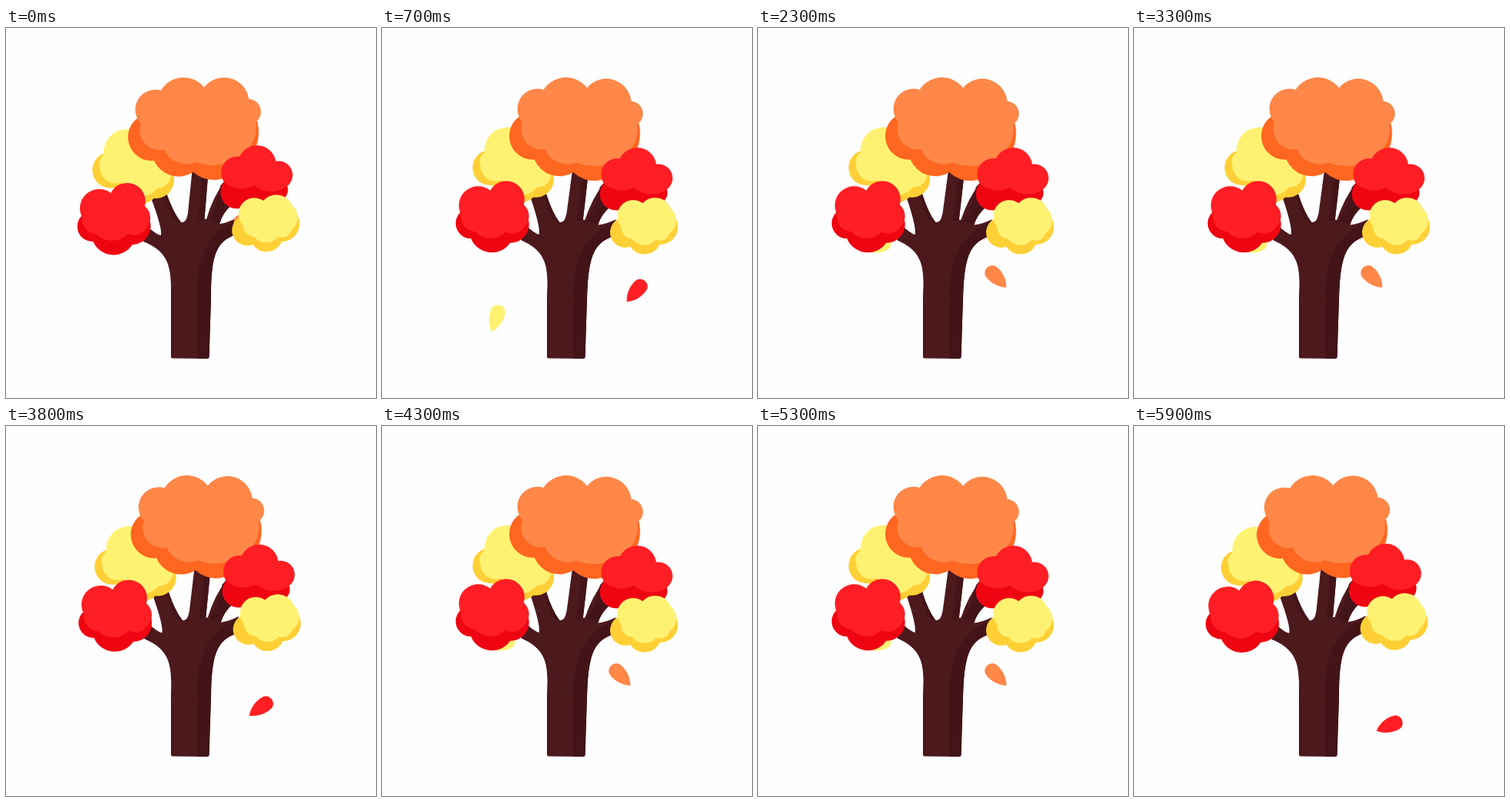
An HTML page that plays this animation: 480 px wide and 480 px high, repeating every 6000 ms.

```html
<!DOCTYPE html>
<html lang="en">
<head>
<meta charset="utf-8">
<title>Autumn tree</title>
<style>
  html, body { margin: 0; height: 100%; overflow: hidden; background: #fefefe; }
  svg { display: block; width: 100vw; height: 100vh; }
  .bark { fill: #4c191d; }
  .bark-shade { fill: #421418; }
  .orange { fill: #ff8748; }
  .orange-shade { fill: #ff6620; }
  .yellow { fill: #fff273; }
  .yellow-shade { fill: #ffd036; }
  .red { fill: #ff1e23; }
  .red-shade { fill: #ee0511; }
</style>
</head>
<body>
<svg viewBox="0 0 480 480">
  <defs>
    <path id="leaf" d="M19 0C10 -9 -3 -11 -11 -9C-19 -6 -19 6 -11 9C-3 11 10 9 19 0Z"/>
  </defs>

  <path class="bark" d="M214 349H266L263.500 427Q263 429 261 429L216 428.500Q214 428.500 214 426.500Z"/>
  <path class="bark-shade" d="M248 349H266L263.500 427Q263 429 261 429H248Z"/>

  <g class="sway">
    <path class="bark" d="M214 351V332C213 306 208 289 178 277L184 258Q195 268 201 269Q203 260 188 220L208 214Q217 240 227 252Q234 254 236 240L242 180H263L257.500 248L260 248Q268 220 284 198L292 230Q281 240 277 254Q287 253 300 246L298 268C274 277 267 292 266 340V351Z"/>
    <path class="bark-shade" d="M248 351V332C249.500 300 259 276 281 259L300 250L298 268C274 277 267 292 266 340V351Z"/>
    <path class="bark-shade" d="M254 180H263L257.500 248Q253 250 249 249Q253 225 254 180ZM278 205L284 198L292 230Q281 240 277 254L263 249Q276 230 278 205ZM203 214H208Q217 240 227 252Q221 252 216 246Z"/>
  </g>

  <g id="leaves"></g>

  <g class="sway">
    <path class="yellow-shade" d="M180 150L217 190A24 24 0 0 1 192 221A32 32 0 0 1 140 207A23.200 23.200 0 0 1 124 164Z"/>
    <path class="yellow" d="M122 182A14 14 0 0 1 127 165A30 30 0 0 1 178 140L214 188A18 18 0 0 1 196 208A26 26 0 0 1 150 200A20 20 0 0 1 122 182Z"/>

    <path class="orange-shade" d="M326 121A55 55 0 0 1 300 183A40 40 0 0 1 243 187A35 35 0 0 1 192 172A30.600 30.600 0 0 1 172 116Z"/>
    <path class="orange" d="M175 124A26 26 0 0 1 201 81A34 34 0 0 1 257 77A32.500 32.500 0 0 1 315 92A16.600 16.600 0 0 1 324 122A42 42 0 0 1 299 168A55 55 0 0 1 247 174A32 32 0 0 1 205 158A26 26 0 0 1 175 124Z"/>

    <path class="red-shade" d="M362 200A15 15 0 0 1 350 225L303 234A21 21 0 0 1 283 200Z"/>
    <path class="red" d="M283 200A21 21 0 0 1 303 167A24.700 24.700 0 0 1 350 173A18.200 18.200 0 0 1 362 207A34 34 0 0 1 322 204A34 34 0 0 1 283 200Z"/>

    <path class="yellow-shade" d="M376 240A23 23 0 0 1 358 277A22 22 0 0 1 320 281A19.800 19.800 0 0 1 302 246Z"/>
    <path class="yellow" d="M307 255A20.700 20.700 0 0 1 334 224A22 22 0 0 1 371 230A20 20 0 0 1 370 262A13 13 0 0 1 353 271A20 20 0 0 1 322 271A16 16 0 0 1 307 255Z"/>

    <path class="red-shade" d="M185 246A24 24 0 0 1 164 281A29 29 0 0 1 113 277A19.500 19.500 0 0 1 99 243Z"/>
    <path class="red" d="M99 246A25 25 0 0 1 136 214A23.700 23.700 0 0 1 180 231A20 20 0 0 1 181 261A18 18 0 0 1 158 267A28 28 0 0 1 118 268A20 20 0 0 1 99 246Z"/>
  </g>
</svg>
<script>
const PERIOD = 1000, STEP = 100, MAX_TILT = 2.85;
const swaying = document.querySelectorAll(".sway");

// Each leaf passes (x, y, angle) at time `at`; speeds are per cycle.
const leaves = [
  { color: "orange", from: 0, to: 0.7, at: 0.3, x: 309, y: 323, angle: 46, dx: -12, dy: 235, spin: 130 },
  { color: "yellow", from: 0.2, to: 0.8, at: 0.3, x: 156, y: 282, angle: 160, dx: -20, dy: 235, spin: -130 },
  { color: "red", from: 0.4, to: 1, at: 0.9, x: 332, y: 388, angle: 157, dx: 10, dy: 235, spin: 130 }
];

for (const leaf of leaves) {
  leaf.node = document.createElementNS("http://www.w3.org/2000/svg", "use");
  leaf.node.setAttribute("href", "#leaf");
  leaf.node.setAttribute("class", leaf.color);
  document.getElementById("leaves").append(leaf.node);
}

function draw(now) {
  const phase = Math.floor((now % PERIOD) / STEP) * STEP / PERIOD;
  const tilt = MAX_TILT * (1 - Math.cos(2 * Math.PI * phase)) / 2;
  for (const part of swaying) part.setAttribute("transform", `rotate(${tilt} 236 350)`);

  for (const { node, from, to, at, x, y, angle, dx, dy, spin } of leaves) {
    const u = phase - at;
    node.style.display = phase >= from && phase < to ? "" : "none";
    node.setAttribute("transform", `translate(${x + dx * u} ${y + dy * u}) rotate(${angle + spin * u})`);
  }
}

const start = performance.now();
function tick() {
  draw(performance.now() - start);
  requestAnimationFrame(tick);
}
tick();
</script>
</body>
</html>
```
